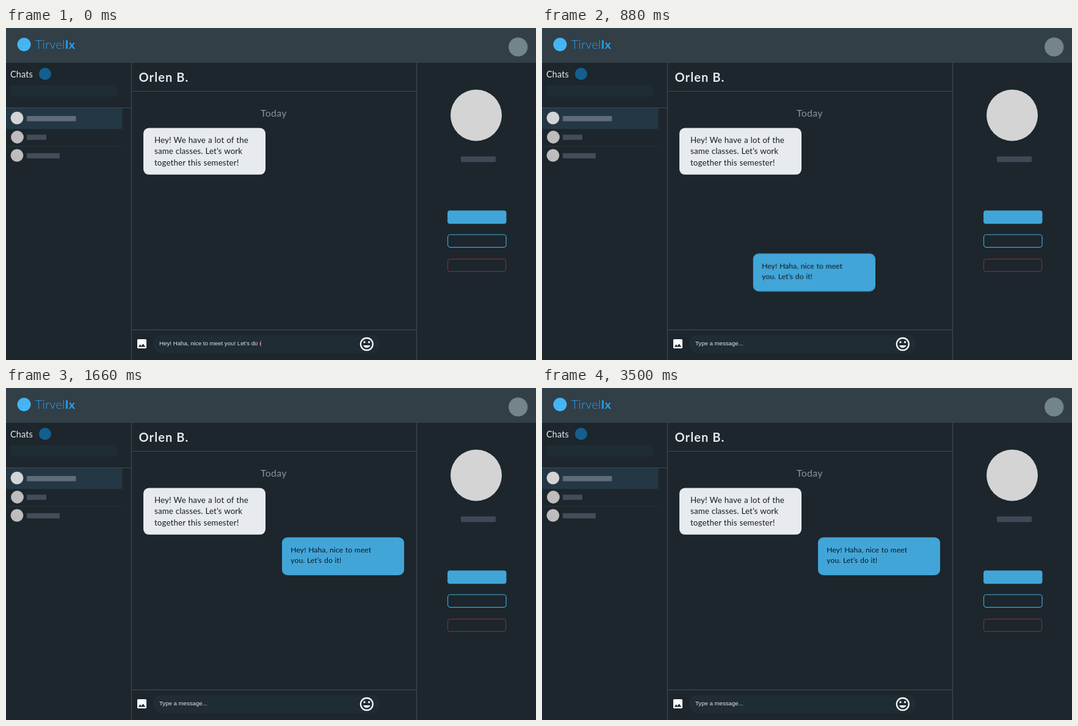
Write an HTML page that moves like this. It is 868 by 543 pixels and loops after 3.82 s.

```html
<!DOCTYPE html>
<html lang="en">
<head>
<meta charset="utf-8">
<title>Chat</title>
<style>
  html, body { margin: 0; width: 100%; height: 100%; overflow: hidden; background: #1c262c; }
  svg { display: block; width: 868px; height: 543px; }
  text { font-family: Lato, "Open Sans", sans-serif; white-space: pre; }
  .logo { font-size: 19.4px; letter-spacing: .4px; fill: #2aa3ee; font-weight: 300; }
  .logo tspan { font-weight: 700; }
  .chats { font-size: 14.5px; letter-spacing: .1px; fill: #e3e6e8; }
  .title { font-size: 20px; font-weight: 700; letter-spacing: 1.1px; fill: #e6eaec; }
  .day { font-size: 15.7px; letter-spacing: .4px; fill: #8796a0; }
  .said { font-size: 13.3px; letter-spacing: .14px; word-spacing: .4px; fill: #161d22; }
  .reply { font-size: 12.2px; letter-spacing: .06px; word-spacing: .5px; fill: #0a1821; }
  .field { font: 9.65px "Liberation Sans", Arial, sans-serif; fill: #dfe3e5; }
  .draft .field { font-size: 9.71px; }
  .rule { stroke: #3d4852; stroke-width: 1.2; }

  /* One 3820 ms loop: finish typing, send, bubble glides into place */
  .draft, .hint, .sent, .t, .bang, .caret { animation: 3820ms step-end infinite; }
  .draft { animation-name: draft; }
  .hint, .sent { animation-name: sent; }
  .t { animation-name: type-t; }
  .bang { animation-name: type-bang; }
  .caret { animation-name: caret; }
  .glide { animation: glide 3820ms infinite; }
  @keyframes draft { 0% { opacity: 1; } 20.5%, 100% { opacity: 0; } }
  @keyframes sent { 0% { opacity: 0; } 20.5%, 100% { opacity: 1; } }
  @keyframes type-t { 0% { fill-opacity: 0; } 3.1%, 100% { fill-opacity: 1; } }
  @keyframes type-bang { 0% { fill-opacity: 0; } 6.8%, 100% { fill-opacity: 1; } }
  @keyframes caret {
    0% { transform: none; opacity: 1; }
    3.1% { transform: translateX(2.7px); opacity: 1; }
    6.8% { transform: translateX(5.4px); opacity: 1; }
    11%, 100% { transform: translateX(5.4px); opacity: 0; }
  }
  @keyframes glide {
    0%, 20.97% { transform: translate(-163px, 191px); animation-timing-function: cubic-bezier(.25, .1, .25, 1); }
    30.35%, 100% { transform: none; }
  }
</style>
</head>
<body>
<svg viewBox="0 0 868 543">
  <rect width="868" height="543" fill="#1c262c"/>

  <!-- Top bar -->
  <rect width="868" height="57" fill="#333f47"/>
  <circle cx="29.5" cy="27" r="11" fill="#45b4f3"/>
  <text class="logo" x="48" y="34">Tirvel<tspan>Ix</tspan></text>
  <circle cx="838.7" cy="31" r="15.6" fill="#74848b"/>

  <!-- Chat list -->
  <text class="chats" x="7" y="80.5">Chats</text>
  <circle cx="64" cy="75" r="10" fill="#145f90"/>
  <rect x="6.5" y="93" width="175" height="19.5" rx="2" fill="#1f2c33"/>
  <rect y="131" width="190.5" height="34" fill="#243744"/>
  <path class="rule" d="M0 130.5H205"/>
  <path d="M0 193.5H190" stroke="#29343c"/>
  <circle cx="18" cy="147.2" r="10.4" fill="#d4d4d4"/>
  <circle cx="18.5" cy="178.5" r="10.4" fill="#bfbcbd"/>
  <circle cx="18" cy="208.3" r="10.4" fill="#bfbcbd"/>
  <rect x="34" y="144" width="80.5" height="8.5" rx="1" fill="#5f6b78"/>
  <rect x="34" y="174.5" width="32" height="8.5" rx="1" fill="#434c59"/>
  <rect x="34" y="204.8" width="54" height="8.5" rx="1" fill="#434c59"/>

  <!-- Conversation -->
  <path class="rule" d="M205.5 57V543M672.5 57V543M205 103.5H672M205 493.7H672"/>
  <text class="title" x="217.5" y="88">Orlen B.</text>
  <text class="day" x="417" y="145">Today</text>
  <rect x="225" y="163.5" width="200" height="76.3" rx="9" fill="#e7eaef"/>
  <text class="said">
    <tspan x="243" y="188.3">Hey! We have a lot of the</tspan>
    <tspan x="243" y="206.4">same classes. Let’s work</tspan>
    <tspan x="243" y="224.5">together this semester!</tspan>
  </text>

  <!-- Message field -->
  <path fill="#fff" fill-rule="evenodd" d="M216.5 509H228.5Q230 509 230 510.5V522.5Q230 524 228.5 524H216.5Q215 524 215 522.5V510.5Q215 509 216.5 509ZM216.8 521.5H228.3L224.6 516.4L221.7 520.1L219.6 517.6Z"/>
  <rect x="240.5" y="502" width="372" height="29.5" rx="14.75" fill="#1f2c33"/>
  <g class="draft">
    <text class="field" x="251" y="519.3">Hey! Haha, nice to meet you! Let's do i<tspan class="t">t</tspan><tspan class="bang">!</tspan></text>
    <rect class="caret" x="416.9" y="511.5" width="1" height="10" fill="#a64c4a"/>
  </g>
  <text class="field hint" x="251" y="519.3">Type a message...</text>
  <g fill="#f4f6f7">
    <circle cx="590.8" cy="517" r="10" fill="none" stroke="#f4f6f7" stroke-width="2.3"/>
    <circle cx="587" cy="513.8" r="1.7"/>
    <circle cx="594.6" cy="513.8" r="1.7"/>
    <path d="M585 519H596.6A6.2 6.2 0 0 1 585 519Z"/>
  </g>

  <!-- Profile -->
  <circle cx="770" cy="142.8" r="42" fill="#d4d4d4"/>
  <rect x="745" y="210" width="57" height="9.2" rx="1" fill="#3f4856"/>
  <rect x="723" y="298.5" width="96.5" height="21.8" rx="4" fill="#42a5d8"/>
  <g fill="none" stroke-width="1.2">
    <rect x="723.5" y="338" width="95.6" height="20.6" rx="4" stroke="#42a5d8"/>
    <rect x="723.5" y="377.8" width="95" height="20.6" rx="4" stroke="#78343a"/>
  </g>

  <!-- Sent bubble -->
  <g class="sent">
    <g class="glide">
      <rect x="452" y="244.2" width="200" height="62" rx="9" fill="#42a5d8"/>
      <text class="reply">
        <tspan x="466.3" y="268.7">Hey! Haha, nice to meet</tspan>
        <tspan x="466.3" y="285.7">you. Let’s do it!</tspan>
      </text>
    </g>
  </g>
</svg>
</body>
</html>
```
